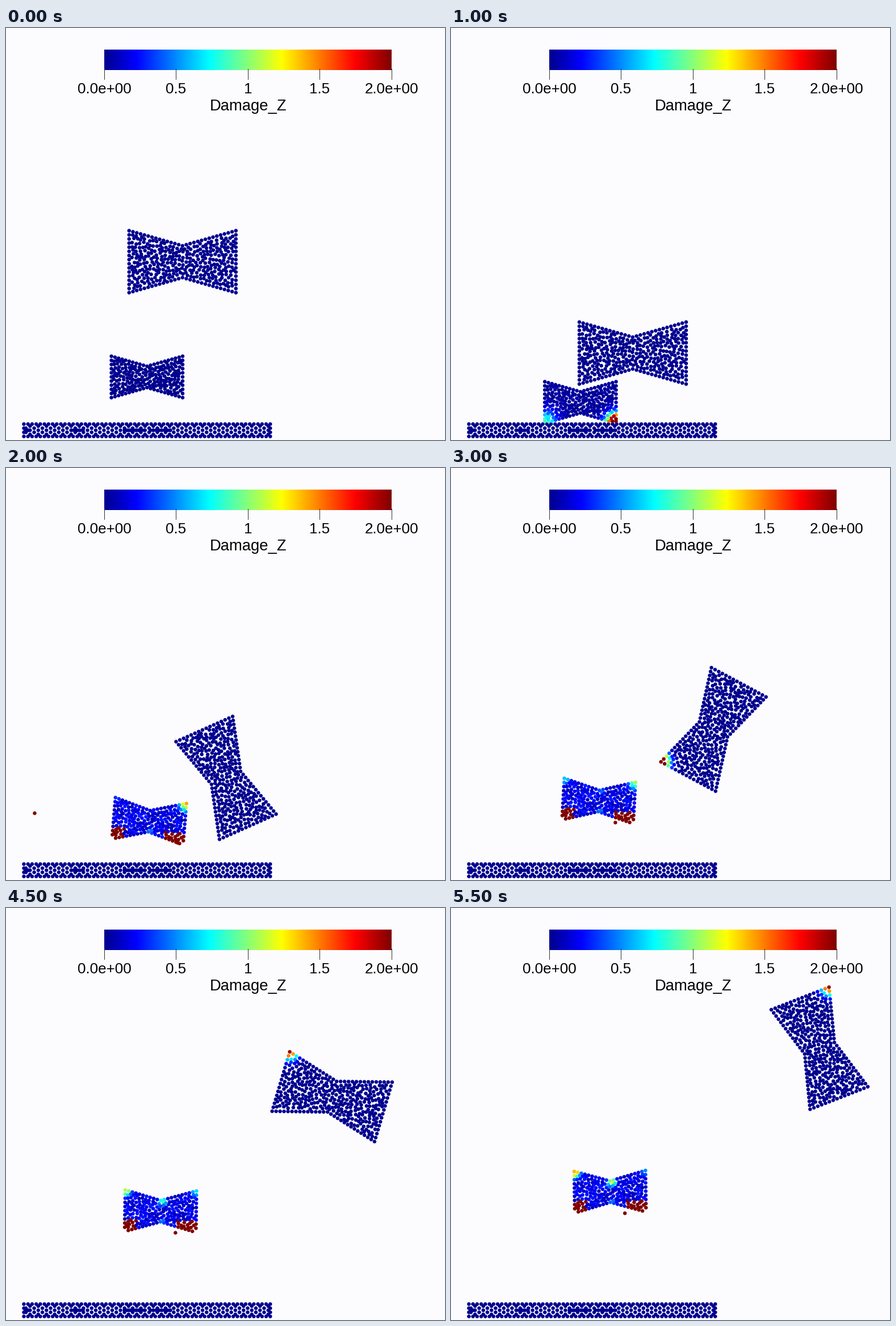
A matplotlib script for the animation above (6 s loop, 773 px wide and 725 px high).

```python
import numpy as np
import matplotlib.pyplot as plt
from matplotlib.animation import FuncAnimation
from matplotlib.colors import LinearSegmentedColormap

WIDTH, HEIGHT, DPI = 773, 725, 100
FRAMES, INTERVAL = 12, 500
VMAX = 2.0
PITCH = 7.23
rng = np.random.default_rng(7)

JET = LinearSegmentedColormap.from_list("damage", [
    (0, (0, 0, 0.5625)), (0.111, (0, 0, 1)), (0.365, (0, 1, 1)),
    (0.492, (0.5, 1, 0.5)), (0.619, (1, 1, 0)), (0.873, (1, 0, 0)),
    (1, (0.5, 0, 0))])


def bow_tie(half_w, half_h, neck, side_steps, slant_steps, spacing):
    """Even nodes on the outline, scattered nodes inside."""
    def edge(x):
        return neck + (half_h - neck) * np.abs(x) / half_w

    side = np.linspace(-half_h, half_h, side_steps + 1)
    xs = np.linspace(-half_w, half_w, 2 * slant_steps + 1)[1:-1]
    points = [(sx * half_w, y) for sx in (-1, 1) for y in side]
    points += [(x, sy * edge(x)) for sy in (-1, 1) for x in xs]
    for x, y in rng.uniform(-1, 1, (9000, 2)) * (half_w - 3, half_h):
        if abs(y) > edge(x) - 3.5:
            continue
        gap = np.hypot(*(np.array(points) - (x, y)).T)
        if gap.min() > spacing:
            points.append((x, y))
    return np.array(points)


def make_plate(left=31, top=696.5, columns=60):
    """Outline nodes around columns that alternate between loose and packed."""
    rows = top + PITCH * np.arange(4)
    xs = left + PITCH * np.arange(columns + 1)
    points = [(x, y) for y in (rows[0], rows[-1]) for x in xs]
    points += [(x, y) for x in (xs[0], xs[-1]) for y in rows[1:-1]]
    for i, x in enumerate(xs[:-1] + PITCH / 2):
        ys = rows[1:-1] if i % 2 == 0 else rows[:-1] + PITCH / 2
        points += [(x, y) for y in ys]
    for start, stop in ((34, 42), (115, 137), (208, 246), (254, 290)):
        points += [(x, rows.mean()) for x in np.arange(start, stop, 5)]
    return np.array(points)


def place(points, center, degrees):
    c, s = np.cos(np.radians(degrees)), np.sin(np.radians(degrees))
    return points @ np.array([[c, s], [-s, c]]) + center


def large_pose(k):
    if k <= 2:
        return (310.3 + 4.6 * k, 410.7 + 80.4 * k), 0
    t = k - 4
    return (387 + 37.35 * t, 544.8 - 42.65 * t), 66 + 26.1 * t


def small_pose(k):
    if k <= 2:
        return (247.8 - 10.2 * k, 613.5 + 22.4 * k), 0
    t = k - 4
    return (251.7 + 4 * t, 621 - 17.9 * t + 0.06 * t * t), 4.8 - 0.8 * t


def spot(points, x, y, radius, level):
    reach = np.hypot(points[:, 0] - x, points[:, 1] - y) / radius
    return level * np.exp(-reach ** 2)


plate = make_plate()
large = bow_tie(94, 54.5, 28, 15, 14, 5.1)
small = bow_tie(62.7, 36.4, 18.7, 10, 10, 4.5)
LOST_LEFT, LOST_RIGHT = 10, 21  # bottom corners that break off the small body
grain = rng.random(len(small))
small_noise = rng.uniform(0.85, 1.15, len(small))
large_noise = rng.uniform(0.85, 1.15, len(large))


def large_damage(k):
    """The struck corner pulses as the body rings after impact."""
    level = 1.7 + 0.9 * np.cos(np.pi * (k - 6) / 2) if k >= 5 else 0
    return spot(large, 94, 54.5, 15, level) * large_noise


def small_damage(k):
    if k < 2:
        return np.zeros(len(small))
    if k == 2:
        spots = [spot(small, -62.7, 36.4, 21, 0.95), spot(small, 62.7, 36.4, 17, 2.8)]
        return np.maximum.reduce(spots) * small_noise + 0.06 * grain
    x, y = small.T
    spots = [spot(small, 62.7, -36.4, 13, 1.65 * np.exp(-0.15 * (k - 4))),
             spot(small, -62.7, -36.4, 12, 0.18 * (k - 2)),
             spot(small, 3, -17, 9, 0.14 * (k - 3)),
             spot(small, 3, 18, 8, 0.45)]
    damage = np.maximum(np.maximum.reduce(spots) * small_noise, 0.06 + 0.22 * grain)
    broken = (y > 16) & ((x < -43) | (x > 30))
    return np.where(broken, VMAX, damage)


def small_points(k):
    center, tilt = small_pose(k)
    xy = place(small, center, tilt)
    xy[:, 1] = np.minimum(xy[:, 1], 691.5)
    if k >= 3:
        xy[LOST_LEFT] = 139 - 89 * (k - 3), 650 - 43 * (k - 3)
        xy[LOST_RIGHT] = np.add(center, (26 + 24 * np.exp(4 - k), 38))
    return xy


fig = plt.figure(figsize=(WIDTH / DPI, HEIGHT / DPI), dpi=DPI, facecolor="#fcfcfe")
ax = fig.add_axes([0, 0, 1, 1])
ax.axis("off")
ax.imshow(np.linspace(0, 1, 256)[None], cmap=JET, extent=(173, 679, 74, 38),
          aspect="auto", interpolation="nearest")
ax.set_xlim(0, WIDTH)
ax.set_ylim(HEIGHT, 0)


def write(x, y, label, pixels):
    ax.text(x, y, label, ha="center", va="baseline", color="black",
            family="Liberation Sans", size=pixels * 72 / DPI)


for i, label in enumerate(("0.0e+00", "0.5", "1", "1.5", "2.0e+00")):
    x = 172.5 + 126.5 * i
    ax.plot([x, x], [72, 90], color="#303030", lw=0.72)
    write(x + 0.5, 115, label, 26)
write(427, 145, "Damage_Z", 27.4)

count = len(plate) + len(small) + len(large)
dots = ax.scatter(np.zeros(count), np.zeros(count), c=np.zeros(count), cmap=JET,
                  vmin=0, vmax=VMAX, s=(6.5 * 72 / DPI) ** 2, linewidths=0, zorder=3)


def update(k):
    large_xy = place(large, *large_pose(k))
    dots.set_offsets(np.vstack([plate, small_points(k), large_xy]) + 0.5)
    dots.set_array(np.concatenate(
        [np.zeros(len(plate)), small_damage(k), large_damage(k)]))
    return (dots,)


animation = FuncAnimation(fig, update, frames=FRAMES, interval=INTERVAL,
                          repeat=True, repeat_delay=0)
plt.show()
```
